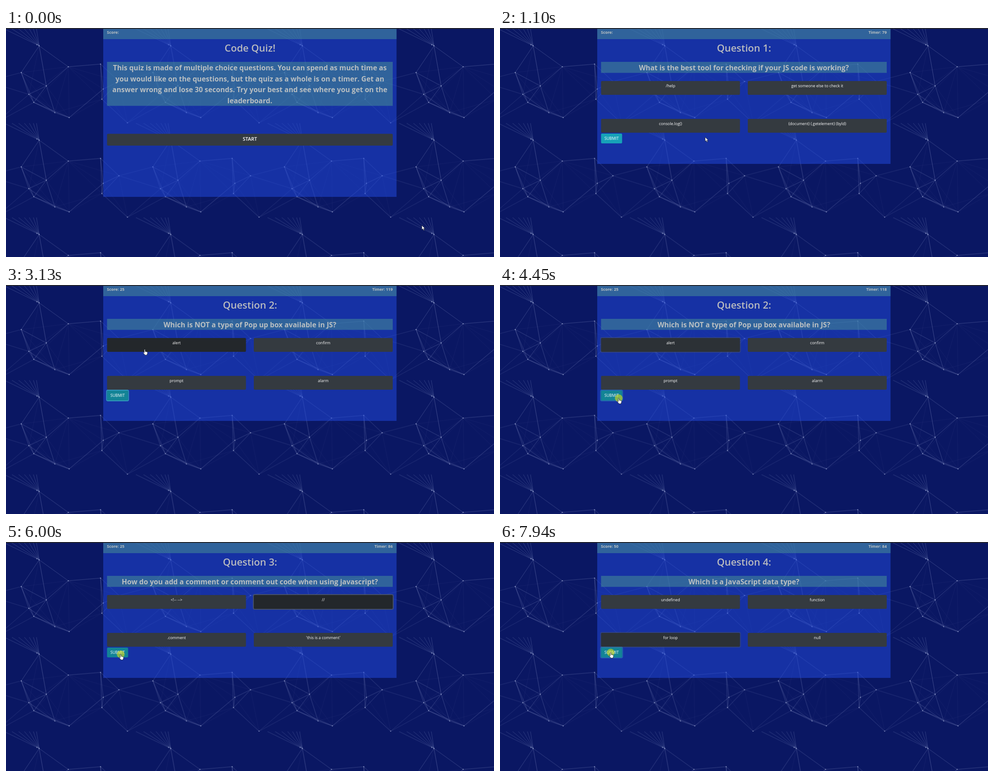
An HTML page for the animation above (8000 ms loop, 1089 by 514 pixels).

```html
<!DOCTYPE html>
<html lang="en">
<head>
<meta charset="utf-8">
<title>Code Quiz</title>
<style>
html, body { margin: 0; width: 100%; height: 100%; overflow: hidden; background: #0a1763; }
svg { display: block; width: 1089px; height: 514px; }
text { font-family: "Open Sans", "Noto Sans", sans-serif; fill: #fff; font-size: 8.8px; }
.mid { text-anchor: middle; }
.stat { font-size: 8.9px; font-weight: 700; fill: #bcc3c4; }
.title { font-size: 22px; font-weight: 600; fill: #b9bbbf; }
.ask { font-size: 15.7px; font-weight: 700; fill: #b9bfc2; }
.start { font-size: 11px; font-weight: 600; }
</style>
</head>
<body>
<svg viewBox="0 0 1089 514" xmlns="http://www.w3.org/2000/svg">
  <defs>
    <pattern id="mesh" patternUnits="userSpaceOnUse" x="-7" y="2" width="293.7" height="211.7">
      <rect width="294" height="212" fill="#0a1763"/>
      <g id="web" transform="translate(7 -2)" stroke="#a9b6e6" stroke-width=".75"></g>
    </pattern>
  </defs>
  <rect width="1089" height="514" fill="url(#mesh)"/>
  <rect width="1089" height="2" fill="#28292d"/>
  <g id="ui"></g>
</svg>
<script>
const $ = id => document.getElementById(id);
function set(el, attrs) {
  for (const k in attrs) el.setAttribute(k, attrs[k]);
}
function add(parent, tag, attrs) {
  const el = document.createElementNS('http://www.w3.org/2000/svg', tag);
  set(el, attrs);
  return parent.appendChild(el);
}

// Background web: near neighbours are joined, also across the tile's sides
const nodes = [[74, 40], [139, 87], [211, 81], [34, 100], [90, 130], [51, 149], [62, 167],
  [109, 190], [141, 201], [252, 120], [217, 137], [214, 160], [271, 213]];
const far = [[0, 4], [6, 8], [8, 10]];
const web = $('web'), tile = 293.7;
function strand(a, b, opacity) {
  add(web, 'line', { x1: a[0], y1: a[1], x2: b[0], y2: b[1], 'stroke-opacity': opacity });
}
const shift = (p, dx) => [p[0] + dx, p[1]];
nodes.forEach((a, i) => nodes.forEach((b, j) => {
  const gap = q => Math.hypot(a[0] - q[0], a[1] - q[1]);
  const d = gap(b), next = shift(b, tile);
  if (i < j && d < 81) strand(a, b, .36);
  else if (i < j && d < 118) strand(a, b, .07);
  if (gap(next) < 100) {
    strand(a, next, .22);
    strand(shift(a, -tile), b, .22);
  }
}));
far.forEach(([i, j]) => strand(nodes[i], nodes[j], .36));
for (let i = 0; i < 7; i++) strand(nodes[0], [68 - 6 * i - i * i, 2], .32);
[...nodes, [69, 37.5]].forEach(([cx, cy]) =>
  add(web, 'circle', { cx, cy, r: 1.1, fill: '#c3cdf0', 'fill-opacity': .75, stroke: 'none' }));

// Page
const ui = $('ui');
const panel = add(ui, 'rect', { x: 217, y: 2, width: 654.5, fill: '#224de6', 'fill-opacity': .5 });
const teal = { fill: '#4a9694', 'fill-opacity': .5 };
add(ui, 'rect', { x: 217, y: 2, width: 654.5, height: 23, ...teal });
const band = add(ui, 'rect', { x: 225.5, y: 76, width: 637.5, ...teal });
const score = add(ui, 'text', { x: 225.3, y: 12.8, class: 'stat' });
const timer = add(ui, 'text', { x: 863, y: 12.8, class: 'stat', 'text-anchor': 'end' });
const title = add(ui, 'text', { x: 544.5, y: 53, class: 'mid title' });
const lines = [0, 1, 2, 3].map(i => add(ui, 'text', { x: 544.2, y: 94.8 + 24.7 * i, class: 'mid ask' }));

const dark = { base: [52, 58, 64], deep: [35, 39, 43], ring: '#52585d' };
const cyan = { base: [23, 162, 184], deep: [19, 132, 150], ring: '#3ab0c3' };
function button(x, y, w, h, skin, textY, cls = '') {
  const g = add(ui, 'g', {});
  const ring = add(g, 'rect', { x: x - 1, y: y - 1, width: w + 2, height: h + 2, rx: 3,
    fill: 'none', stroke: skin.ring, 'stroke-width': 2 });
  const face = add(g, 'rect', { x, y, width: w, height: h, rx: 2.3 });
  const label = add(g, 'text', { x: x + w / 2, y: textY, class: 'mid ' + cls });
  return { g, x, y, w, h, skin, ring, face, label };
}
const option = i => {
  const y = i < 2 ? 119 : 204;
  return button(i % 2 ? 553 : 225.5, y, 310, 31, dark, y + 14.3);
};
const SUBMIT = 4, START = 5;
const buttons = [0, 1, 2, 3].map(option);
buttons.push(button(225.5, 237, 47, 22, cyan, 251.4),
  button(225.5, 237.5, 637.5, 26.5, dark, 253.2, 'start'));
buttons[SUBMIT].label.textContent = 'SUBMIT';
buttons[START].label.textContent = 'START';

const halo = add(ui, 'circle', { r: 8.6, fill: '#ffeb00', 'fill-opacity': .5 });
const ink = { fill: '#fff', stroke: '#10131c', 'stroke-width': .7, 'stroke-linejoin': 'round' };
const arrow = add(ui, 'path', { d: 'M0 0V9.6L2.2 7.6L3.8 11.2L5.5 10.4L3.9 7H6.9Z', ...ink });
const hand = add(ui, 'path', { d: 'M-1 .6Q0-.7 1 .6V4.6L4.5 5.4Q6 5.2 6.2 6.6V9.2L5.2 11V12.6H-.2V11.4'
  + 'L-3.3 7.8Q-3.2 6.5-1.9 6.9L-1 7.7Z', ...ink });

// Story
const pages = [
  { at: 0, score: '', title: 'Code Quiz!', ask: [
    'This quiz is made of multiple choice questions. You can spend as much time as',
    'you would like on the questions, but the quiz as a whole is on a timer. Get an',
    'answer wrong and lose 30 seconds. Try your best and see where you get on the',
    'leaderboard.'], options: [] },
  { at: 1100, score: '', title: 'Question 1:',
    ask: ['What is the best tool for checking if your JS code is working?'],
    options: ['/help', 'get someone else to check it', 'console.log()', '(document) (.getelement) (byId)'] },
  { at: 2580, score: ' 25', title: 'Question 2:',
    ask: ['Which is NOT a type of Pop up box available in JS?'],
    options: ['alert', 'confirm', 'prompt', 'alarm'] },
  { at: 4570, score: ' 25', title: 'Question 3:',
    ask: ['How do you add a comment or comment out code when using javascript?'],
    options: ['<!-- -->', '//', '.comment', "'this is a comment'"] },
  { at: 6090, score: ' 50', title: 'Question 4:',
    ask: ['Which is a JavaScript data type?'],
    options: ['undefined', 'function', 'for loop', 'null'] }
];
const clock = [[0, ''], [1100, 79], [1300, 120], [2700, 119], [3680, 118],
  [4570, 88], [5010, 87], [5600, 86], [6500, 85], [7300, 84]];

// Clicks: time, button, delay until the focus moves
const clicks = [[960, START, 20], [1740, 2, 20], [2480, SUBMIT, 20], [3250, 0, 20], [4450, SUBMIT, -50],
  [5390, 1, 20], [6000, SUBMIT, 20], [6960, 2, 20], [7940, SUBMIT, -50]];
const hold = 100;

// Pointer: time, x, y
const route = [[100, 928, 443], [640, 540, 208], [840, 460, 243], [960, 458, 240],
  [1100, 458, 245], [1620, 400, 221], [1950, 400, 221], [2380, 261, 254],
  [2810, 261, 254], [3200, 320, 121], [3680, 320, 121], [4120, 265, 254], [4570, 265, 254],
  [4760, 300, 284], [5220, 620, 137], [5480, 620, 137], [5920, 256, 252],
  [6220, 256, 252], [6400, 275, 261], [6750, 321, 211], [7080, 321, 211], [7720, 247, 248]];

function pointer(t) {
  const i = route.findIndex(k => k[0] > t);
  const b = route[i < 0 ? route.length - 1 : i], a = i > 0 ? route[i - 1] : b;
  const p = a === b ? 0 : (t - a[0]) / (b[0] - a[0]);
  return [a[1] + (b[1] - a[1]) * p, a[2] + (b[2] - a[2]) * p];
}
const last = (list, test) => list.filter(test).pop();

// How far the focus of click k has moved in at time t
function fade(k, t) {
  if (!clicks[k]) return 0;
  const [at, , delay] = clicks[k];
  return Math.min(1, Math.max(0, (t - at - delay) / hold));
}
function focus(i, t) {
  let level = 0;
  clicks.forEach(([at, target], k) => {
    const kept = target === SUBMIT || at >= shown.at;
    if (target === i && kept) level = Math.max(level, fade(k, t) - fade(k + 1, t));
  });
  return level;
}

let shown = null;
function turn(page) {
  if (page === shown) return;
  shown = page;
  const intro = page === pages[0];
  set(panel, { height: intro ? 377 : 303 });
  set(band, { height: intro ? 98.7 : 24.7 });
  score.textContent = 'Score:' + page.score;
  title.textContent = page.title;
  lines.forEach((el, i) => { el.textContent = page.ask[i] || ''; });
  buttons.forEach((b, i) => {
    b.live = intro === (i === START);
    b.g.style.display = b.live ? '' : 'none';
    if (i < SUBMIT) b.label.textContent = page.options[i] || '';
  });
}

const show = (el, on) => { el.style.display = on ? '' : 'none'; };
function draw(t) {
  turn(last(pages, p => p.at <= t));
  const left = last(clock, c => c[0] <= t)[1];
  timer.textContent = left ? 'Timer: ' + left : '';

  const [x, y] = pointer(t);
  const over = buttons.find(b => b.live && x > b.x && x < b.x + b.w && y > b.y && y < b.y + b.h);
  buttons.forEach((b, i) => {
    const ring = focus(i, t), deep = b === over ? 1 : ring;
    const rgb = b.skin.base.map((v, j) => Math.round(v + (b.skin.deep[j] - v) * deep));
    set(b.face, { fill: `rgb(${rgb})` });
    set(b.ring, { 'stroke-opacity': ring * .8 });
  });

  for (const el of [arrow, hand, halo]) set(el, { transform: `translate(${x} ${y})` });
  show(arrow, !over);
  show(hand, over);
  show(halo, clicks.some(c => t >= c[0] && t < c[0] + hold));
}

const begin = performance.now();
function loop() {
  draw((performance.now() - begin) % 8000);
  requestAnimationFrame(loop);
}
loop();
</script>
</body>
</html>
```
